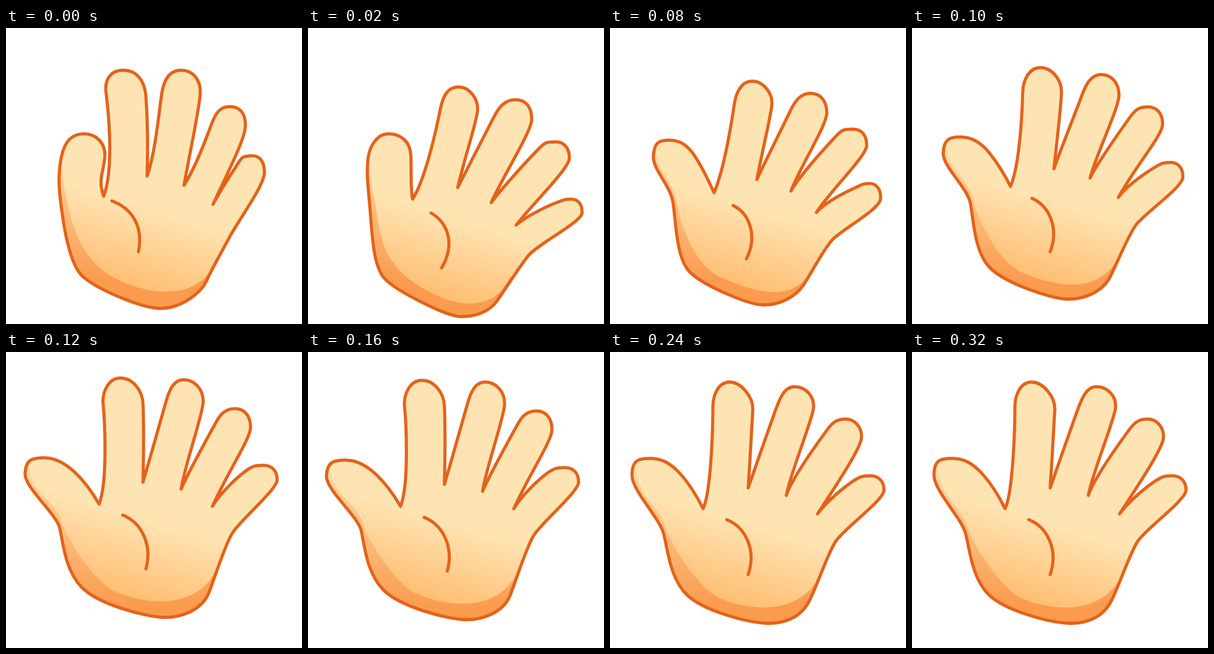
These frames come from a looping animation (512 by 512 pixels, 0.34 s). An HTML page without scripts:

```html
<!DOCTYPE html>
<html lang="en">
<head>
<meta charset="utf-8">
<title>Waving hand</title>
<style>
html, body { margin: 0; width: 100%; height: 100%; overflow: hidden; background: #fff; }
svg { display: block; width: 100vw; height: 100vh; }
.line { fill: none; stroke: #e5621a; stroke-width: 5.4; stroke-linecap: round; stroke-linejoin: round; }

/* The drawing advances every 20 ms; steps() counts the drawings up to the next pose. */
.hand, .crease, .rim, .tint, .bob { animation: 340ms steps(4) infinite; }
.hand { animation-name: hand; }
.crease { animation-name: crease; }
.rim { animation-name: rim; }
.tint { animation-name: tint; }
.bob { animation-name: bob; }

/* Outline order: index, middle, ring, little finger, palm, thumb. */
@keyframes hand {
  from {
    animation-timing-function: steps(1);
    d: path("M169 291C188 240 176 135 173 112S181 73 203 73S240 90 242 118S246 200 244 256\
C259 215 266 132 270 110S284 73 303 73S337 88 336 113S316 225 308 272\
C330 238 349 183 356 165S370 136 387 136S415 147 414 170S385 247 358 305\
C376 272 392 249 400 236S409 222 423 221S447 228 447 250S402 333 387 361\
S357 415 347 437S302 485 268 485S158 452 133 430S99 335 95 305\
S90 250 96 222S115 183 135 183S172 198 171 222S158 262 169 291Z");
  }
  5.88% {
    animation-timing-function: linear(0 0% 33.3%, .12 33.3% 66.6%, .46 66.6% 100%);
    d: path("M181 296C205 258 225 160 229 140S240 103 259 102S296 122 293 145S268 235 259 276\
C275 245 313 170 322 153S341 124 359 124S387 137 387 158S334 262 317 302\
C336 276 387 221 400 208S414 198 428 197S453 208 452 226S385 308 360 341\
C378 325 416 307 430 302S444 296 455 296S475 304 474 320S398 373 381 394\
S342 451 327 472S285 500 262 499S154 456 133 434S111 355 107 310\
S101 248 104 225S121 183 139 183S177 193 178 222S177 275 181 296Z");
  }
  23.52% {
    animation-timing-function: steps(2);
    d: path("M180 285C199 240 212 152 215 132S227 92 246 92S282 113 280 133S263 215 254 262\
C266 236 304 160 312 143S330 113 347 113S375 126 375 147S326 246 313 282\
C330 252 378 201 390 188S405 175 420 175S444 185 444 203S385 277 357 319\
C376 298 412 282 425 276S436 270 447 269S469 276 468 295S400 349 384 367\
S350 421 335 444S290 480 264 479S162 446 138 422S114 333 109 302\
S74 245 75 222S84 194 101 194S132 199 147 222S171 265 180 285Z");
  }
  35.29%, 47.05% {
    d: path("M161 263C177 222 170 110 168 90S177 45 198 45S236 66 237 90S238 180 237 225\
C249 183 270 111 275 92S287 49 306 48S342 64 341 87S308 200 303 237\
C315 208 355 137 363 122S380 98 396 98S423 110 423 130S385 205 357 267\
C372 242 400 217 413 207S431 196 445 196S469 204 469 221S404 292 391 314\
S363 385 351 416S302 460 272 459S160 437 131 407S99 331 93 305\
S32 235 33 210S47 183 66 183S103 193 119 208S150 244 161 263Z");
  }
  70.58%, to {
    d: path("M161 271C176 240 178 115 178 95S187 52 207 52S248 78 247 100S242 190 239 235\
C253 195 278 123 285 104S300 60 319 60S354 76 352 97S311 212 305 248\
C317 213 366 148 376 134S394 116 408 116S436 129 435 148S390 232 359 280\
C375 258 405 234 418 225S437 214 450 214S474 222 474 239S404 306 390 328\
S360 400 345 430S300 471 268 469S162 448 133 420S100 343 93 315\
S38 240 38 213S50 184 70 184S105 193 120 209S151 250 161 271Z");
  }
}

@keyframes crease {
  from { animation-timing-function: steps(1); d: path("M183 299C218 312 238 343 229 387"); }
  5.88% {
    animation-timing-function: linear(0 0% 33.3%, .12 33.3% 66.6%, .46 66.6% 100%);
    d: path("M213 320C243 338 255 375 231 415");
  }
  23.52% { animation-timing-function: steps(2); d: path("M213 307C243 322 255 362 236 399"); }
  35.29%, 47.05% { d: path("M202 282C236 296 253 335 242 375"); }
  70.58%, to { d: path("M202 290C236 304 253 344 239 385"); }
}

/* Shaded edge; the hand clips its outer side. */
@keyframes rim {
  from {
    animation-timing-function: steps(1);
    d: path("M98 215C95 260 103 290 110 320S135 400 180 428S335 485 364 398L500 600H-60V215Z");
  }
  5.88% {
    animation-timing-function: linear(0 0% 33.3%, .12 33.3% 66.6%, .46 66.6% 100%);
    d: path("M106 225C106 260 114 290 119 320S127 400 180 438S315 505 350 430L500 600H-60V225Z");
  }
  23.52% {
    animation-timing-function: steps(2);
    d: path("M79 205C80 250 110 265 115 300S145 412 195 433S325 485 355 405L500 600H-60V205Z");
  }
  35.29%, 47.05% {
    d: path("M39 190C39 243 85 255 95 290S155 400 190 415S335 460 370 362L500 600H-60V190Z");
  }
  70.58%, to {
    d: path("M44 190C44 250 85 265 95 300S155 410 190 426S335 470 372 368L500 600H-60V190Z");
  }
}

@keyframes tint {
  from { animation-timing-function: steps(1); transform: translateY(13px); }
  5.88% {
    animation-timing-function: linear(0 0% 33.3%, .12 33.3% 66.6%, .46 66.6% 100%);
    transform: translateY(28px);
  }
  23.52% { animation-timing-function: steps(2); transform: translateY(10px); }
  35.29%, 47.05% { transform: translateY(-9px); }
  70.58%, to { transform: translateY(0); }
}

@keyframes bob {
  from, 35.29% { animation-timing-function: steps(2); transform: translate(0, 0); }
  47.05% { transform: translate(-1px, 4px); }
  70.58%, to { transform: translate(0, 0); }
}
</style>
</head>
<body>
<svg viewBox="0 0 512 512">
  <defs>
    <linearGradient id="skin" gradientUnits="userSpaceOnUse" x1="203" y1="285" x2="162" y2="425">
      <stop stop-color="#ffe4b3"/>
      <stop offset="1" stop-color="#ffbc70"/>
    </linearGradient>
    <linearGradient id="shadow" gradientUnits="userSpaceOnUse" x1="0" y1="200" x2="0" y2="440">
      <stop stop-color="#ffdaa6"/>
      <stop offset="1" stop-color="#fa9b4e"/>
    </linearGradient>
    <clipPath id="inside"><path class="hand"/></clipPath>
  </defs>
  <g class="bob">
    <g clip-path="url(#inside)">
      <rect class="tint" x="-100" y="-100" width="712" height="712" fill="url(#skin)"/>
      <path class="rim" fill="url(#shadow)"/>
    </g>
    <path class="hand line"/>
    <path class="crease line"/>
  </g>
</svg>
</body>
</html>
```
